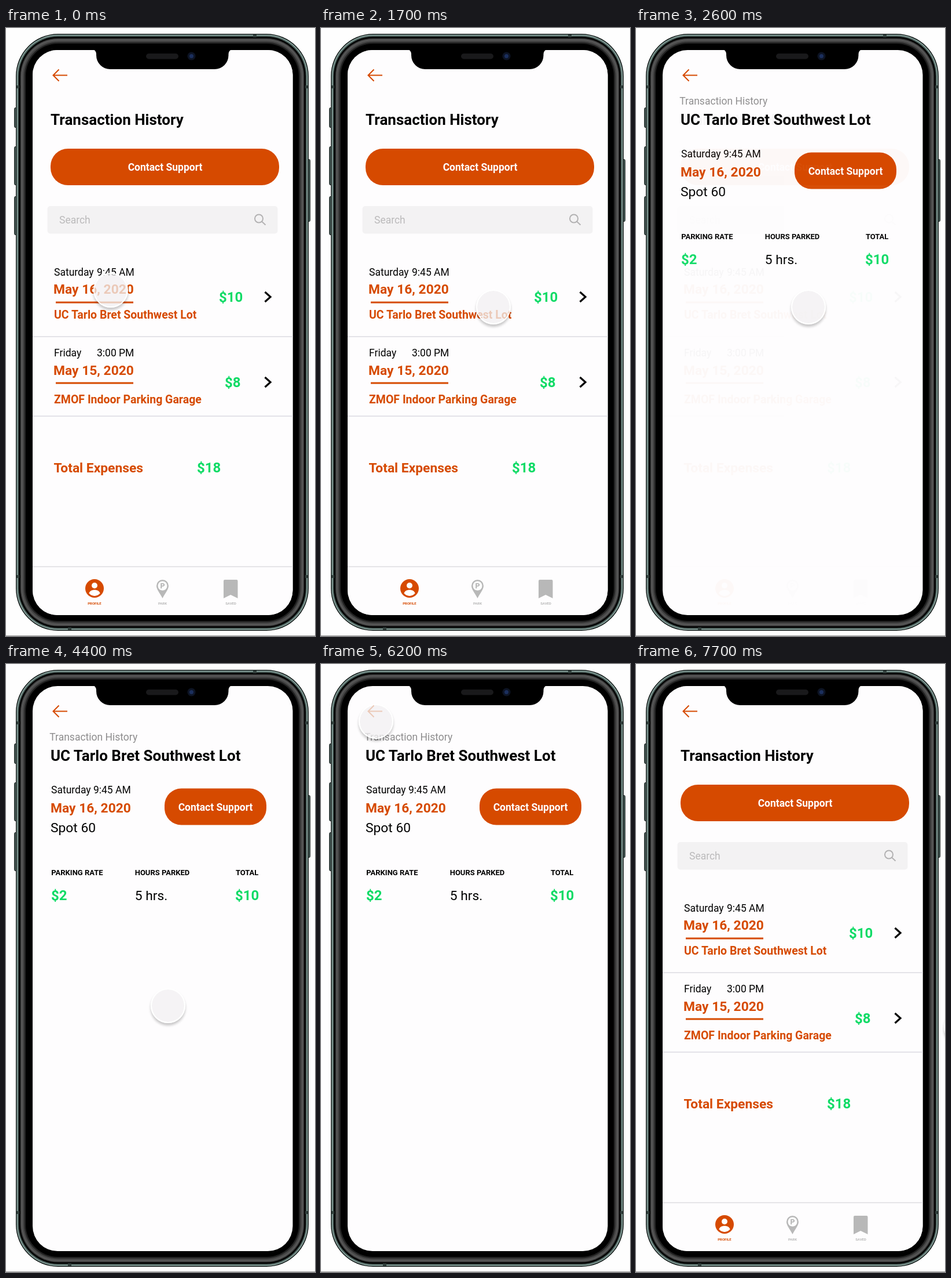
Animation, 534 px wide and 1048 px high, one loop 7.8 s. Source, as an HTML page:

```html
<!DOCTYPE html>
<html lang="en">
<head>
<meta charset="utf-8">
<title>Transaction History</title>
<style>
  html, body { margin: 0; width: 100%; height: 100%; overflow: hidden; background: #fefefe; }
  svg { position: absolute; left: 0; top: 0; }
  text { font: 17.5px Roboto, sans-serif; }
  .b { font-weight: 700; }
  .title { font-size: 26px; font-weight: 700; }
  .date { font-size: 22.8px; font-weight: 700; fill: #d64a00; }
  .big { font-size: 22.8px; }
  .place { font-size: 19.5px; font-weight: 700; fill: #d64a00; }
  .money { font-size: 24px; font-weight: 700; fill: #0fdb66; }
  .head { font-size: 13px; font-weight: 700; }
  .tab { font-size: 6px; font-weight: 700; fill: #b8b8b8; }
  .mid { text-anchor: middle; }
  .btn { font-weight: 700; fill: #fff; text-anchor: middle; }
  .line { fill: none; stroke: #d64a00; stroke-width: 3; }
  .rule { stroke: #e4e3e8; stroke-width: 2; }
  .chev { fill: none; stroke: #000; stroke-width: 3.2; }
  .band { fill: #2f3d3a; }
  #cursor {
    position: absolute; left: -30px; top: -30px; width: 60px; height: 60px; box-sizing: border-box;
    border: 2px solid #fff; border-radius: 50%; background: rgba(242, 241, 242, .76);
    background-clip: padding-box; box-shadow: 0 4px 4px rgba(0, 0, 0, .22);
  }
</style>
</head>
<body>
<svg width="534" height="1048" viewBox="0 0 534 1048">
  <!-- phone body -->
  <rect y="1047" width="534" height="1" fill="#999"/>
  <g fill="#4e625e" stroke="#0e1514">
    <rect x="14.5" y="137.5" width="6" height="34" rx="2"/>
    <rect x="14.5" y="204.5" width="6" height="66" rx="2"/>
    <rect x="14.5" y="290.5" width="6" height="66" rx="2"/>
    <rect x="519.5" y="226.5" width="6" height="107" rx="2"/>
  </g>
  <g id="shell"></g>
  <g class="band">
    <rect x="427" y="11" width="6" height="5"/>
    <rect x="107" y="1033" width="6" height="5"/>
    <rect x="18" y="99" width="5" height="5"/>
    <rect x="18" y="943" width="5" height="5"/>
    <rect x="517" y="99" width="5" height="5"/>
    <rect x="517" y="943" width="5" height="5"/>
  </g>

  <clipPath id="glass"><rect x="46" y="38" width="449.5" height="974" rx="43"/></clipPath>
  <g clip-path="url(#glass)">
    <rect x="45" y="37" width="451" height="976" fill="#fefdfe"/>

    <g id="detail">
      <text x="75.3" y="132" fill="#8d8c8d">Transaction History</text>
      <text class="title" x="77" y="167">UC Tarlo Bret Southwest Lot</text>
      <text x="78" y="223.3">Saturday 9:45 AM</text>
      <text class="date" x="77" y="256">May 16, 2020</text>
      <text class="big" x="77" y="290">Spot 60</text>
      <rect x="274" y="214.5" width="176" height="63" rx="29" fill="#d64a00"/>
      <text class="btn" x="362" y="253">Contact Support</text>
      <text class="head" x="78.3" y="363.7">PARKING RATE</text>
      <text class="head" x="222.7" y="363.7">HOURS PARKED</text>
      <text class="head" x="397" y="363.7">TOTAL</text>
      <text class="money" x="78" y="407.3">$2</text>
      <text class="big" x="222.7" y="407.3">5 hrs.</text>
      <text class="money" x="396" y="407.3">$10</text>
    </g>

    <g id="list">
      <rect x="45" y="37" width="451" height="976" fill="#fefdfe"/>
      <text class="title" x="77" y="167">Transaction History</text>
      <rect x="77" y="208" width="395" height="63" rx="30" fill="#d64a00"/>
      <text class="btn" x="275" y="246">Contact Support</text>
      <rect x="71.5" y="307" width="398" height="47.5" rx="5" fill="#f3f2f3"/>
      <text x="92" y="336.5" fill="#bbbabb">Search</text>
      <g fill="none" stroke="#b3b2b3" stroke-width="2">
        <circle cx="437" cy="328.5" r="7"/>
        <path d="M442 333.5 448.5 339.5"/>
      </g>

      <text x="83" y="427">Saturday</text>
      <text x="157" y="427">9:45 AM</text>
      <text class="date" x="82" y="458">May 16, 2020</text>
      <path class="line" d="M86 473H220"/>
      <text class="place" x="83" y="501">UC Tarlo Bret Southwest Lot</text>
      <text class="money" x="368" y="472">$10</text>
      <path class="chev" d="M447.5 455 457 463.5 447.5 472"/>
      <path class="rule" d="M45 532H496"/>

      <text x="83" y="566">Friday</text>
      <text x="157" y="566">3:00 PM</text>
      <text class="date" x="82" y="598">May 15, 2020</text>
      <path class="line" d="M86 612H220"/>
      <text class="place" x="83" y="647">ZMOF Indoor Parking Garage</text>
      <text class="money" x="378" y="619">$8</text>
      <path class="chev" d="M447.5 602 457 610.5 447.5 619"/>
      <path class="rule" d="M45 669H496"/>

      <text class="date" x="82.5" y="766">Total Expenses</text>
      <text class="money" x="330" y="766">$18</text>

      <path d="M45 928.5H496" stroke="#dcdbdf" stroke-width="1.5"/>
      <circle cx="153" cy="966" r="16" fill="#d64a00"/>
      <circle cx="153" cy="961" r="5" fill="#fff"/>
      <path d="M143.5 974.5C145 966.5 161 966.5 162.5 974.5A12.5 12.5 0 0 1 143.5 974.5Z" fill="#fff"/>
      <path d="M270.5 983C266 974 260 968 260 961.5A10.5 10.5 0 0 1 281 961.5C281 968 275 974 270.5 983Z" fill="#b8b8b8"/>
      <circle cx="270.5" cy="961.5" r="8" fill="#fff"/>
      <text class="b mid" x="270.5" y="966" fill="#b0b0b0" style="font-size:12.5px">P</text>
      <path d="M376 983V953Q376 951 378 951H398.5Q400.5 951 400.5 953V983L388.2 977Z" fill="#b8b8b8"/>
      <text class="tab mid" x="153" y="993.5" style="fill:#d64a00">PROFILE</text>
      <text class="tab mid" x="270.5" y="993.5">PARK</text>
      <text class="tab mid" x="388.5" y="993.5">SAVED</text>
    </g>

    <path d="M106 81.5H81M91.5 71.5 81.5 81.5 91.5 91.5" fill="none" stroke="#d64a00" stroke-width="2"/>
    <path d="M149 37A7 8 0 0 1 156 45V47A24 24 0 0 0 180 71H360.5A24 24 0 0 0 384.5 47V45A7 8 0 0 1 391 37Z"/>
  </g>
  <rect x="242" y="44" width="56" height="9.5" rx="4.7" fill="#19191b"/>
  <circle cx="320.5" cy="48.5" r="7" fill="#0d1424"/>
  <circle cx="320.5" cy="48.5" r="3.5" fill="#1b2f5d"/>
</svg>
<div id="cursor"></div>
<script>
  const LOOP = 7800, STEP = 100;
  const $ = id => document.getElementById(id);

  // nested rounded rings of the phone's rim: inset, colour
  $('shell').innerHTML = [
    [0, '#0e1514'], [1.5, '#93aea8'], [3, '#4e625e'], [5, '#000'],
    [7.5, '#2e2e2e'], [9, '#555'], [12, '#444'], [14.5, '#222'], [17, '#000']
  ].map(([d, c]) => `<rect x="${17 + d}" y="${10 + d}" width="${506 - 2 * d}" height="${1029 - 2 * d}" rx="${73 - d}" fill="${c}"/>`).join('');

  // cursor stops: time, x, y
  const stops = [
    [0, 181, 452], [800, 150, 608], [1300, 300, 540], [1700, 298, 481], [2800, 298, 481],
    [3800, 280, 589], [5000, 280, 589], [6200, 95, 99], [6800, 96, 81], [7300, 96, 81],
    [7700, 562, 626], [LOOP, 562, 626]
  ];
  const clamp = v => Math.min(1, Math.max(0, v));
  const smooth = u => u * u * (3 - 2 * u);
  const dissolve = (t, start) => 1 - (1 - clamp((t - start) / 300)) ** 2;

  function draw(t) {
    const i = stops.findIndex(s => s[0] > t);
    const [t0, x0, y0] = stops[i - 1], [t1, x1, y1] = stops[i];
    const u = smooth((t - t0) / (t1 - t0));
    $('cursor').style.transform = `translate(${x0 + (x1 - x0) * u}px, ${y0 + (y1 - y0) * u}px)`;
    $('list').setAttribute('opacity', 1 - dissolve(t, 2348) + dissolve(t, 7170));
  }

  const begin = performance.now();
  function tick() {
    const t = (performance.now() - begin) % LOOP;
    draw(Math.floor(t / STEP) * STEP);
    requestAnimationFrame(tick);
  }
  tick();
</script>
</body>
</html>
```
